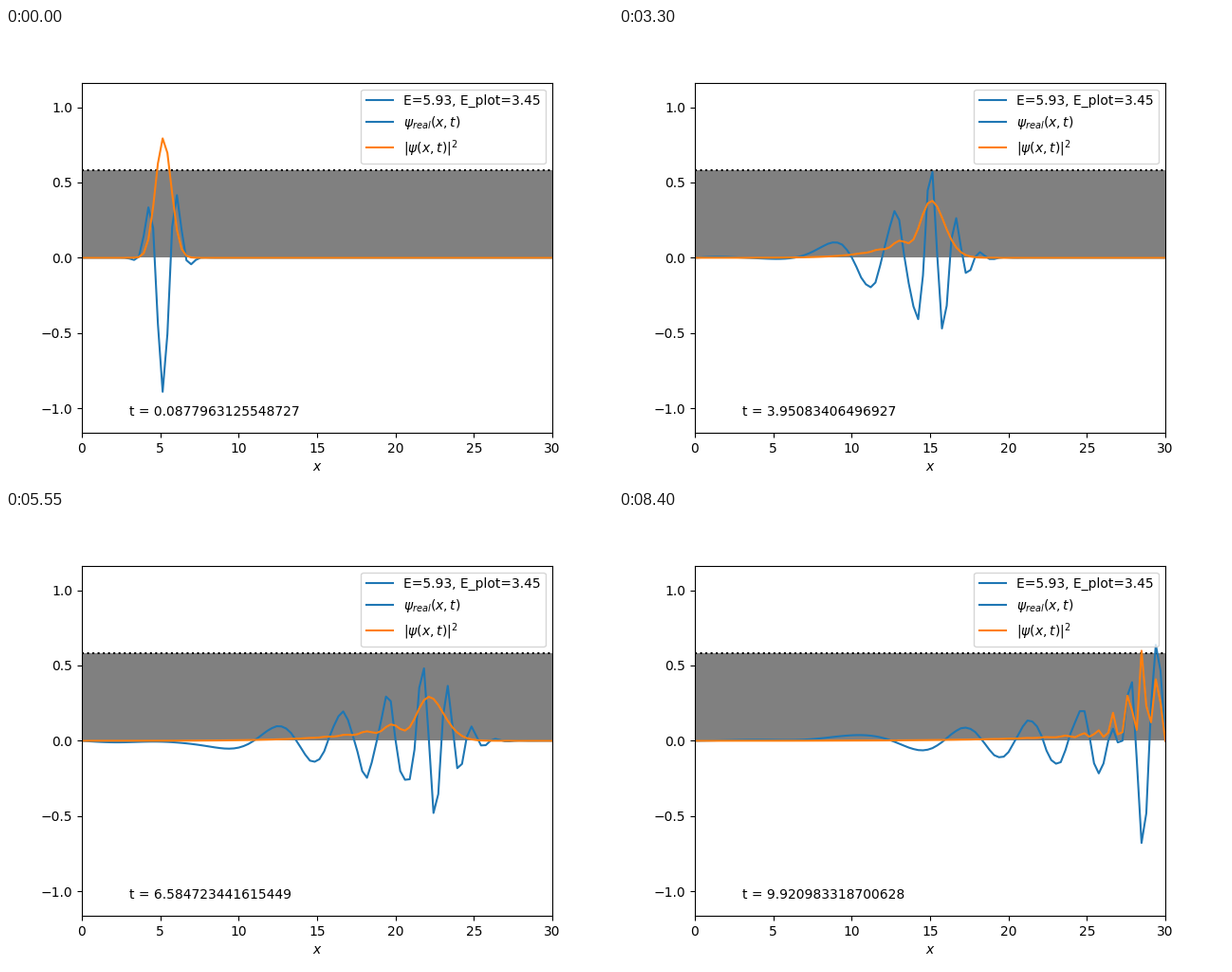
A matplotlib script that plays this animation: 640x480 px, repeating every 8550 ms.

```python
import numpy as np
import matplotlib.pyplot as plt
from matplotlib.animation import FuncAnimation

# Wave packet in a box with a constant potential (hbar = m = 1)
N, LENGTH = 100, 30.0
V0 = 1.0
X0, SIGMA, K0 = 5.0, 0.5, np.pi
FRAMES, INTERVAL = 57, 150
STEPS = 2 * FRAMES - 1

x = np.linspace(0, LENGTH, N)
dx = x[1] - x[0]
dt = 2 / (2 / dx**2 + V0)
times = np.cumsum(np.full(STEPS, dt))


def initial_packet():
    norm = (2 * np.pi * SIGMA**2) ** -0.25
    return norm * np.exp(-((x - X0) / (2 * SIGMA)) ** 2 + 1j * K0 * x)


def step_matrix():
    """Crank-Nicolson step for the interior points, zero at both walls."""
    n = N - 2
    eye = np.eye(n)
    lap = (np.eye(n, k=1) + np.eye(n, k=-1) - 2 * eye) / dx**2
    half = 0.5j * dt * (-0.5 * lap + V0 * eye)
    return np.linalg.solve(eye + half, eye - half)


def evolve():
    step = step_matrix()
    psi = initial_packet()
    psi[[0, -1]] = 0
    states = []
    for _ in range(STEPS):
        psi = psi.copy()
        psi[1:-1] = step @ psi[1:-1]
        states.append(psi)
    return states


states = evolve()

# The potential is drawn at half the height of the upper half plane
ymax = 1.163
scale = ymax / 2 / V0
energy = K0**2 / 2 + V0
v_plot = np.full(N, V0 * scale)

plt.rcParams["font.family"] = "DejaVu Sans"
fig, ax = plt.subplots(figsize=(6.4, 4.8), dpi=100)
ax.set_xlim(0, LENGTH)
ax.set_ylim(-ymax, ymax)
ax.set_xlabel("$x$")

ax.fill_between(x, v_plot, facecolor="gray", linewidth=0)
ax.plot(x, v_plot, ":k")
ax.axhline(energy * scale, color="C0",
           label=f"E={energy:.2f}, E_plot={energy * scale:.2f}")
real_line, = ax.plot([], [], color="C0", label=r"$\psi_{real}(x,t)$")
prob_line, = ax.plot([], [], color="C1", label=r"$|\psi(x,t)|^2$")
clock = ax.text(3, -0.9 * ymax, "")
ax.legend(loc="upper right")


def update(frame):
    i = 2 * frame
    psi = states[i]
    real_line.set_data(x, psi.real)
    prob_line.set_data(x, np.abs(psi) ** 2)
    clock.set_text(f"t = {float(times[i])}")
    return real_line, prob_line, clock


anim = FuncAnimation(fig, update, frames=FRAMES, interval=INTERVAL, repeat=True)
plt.show()
```
